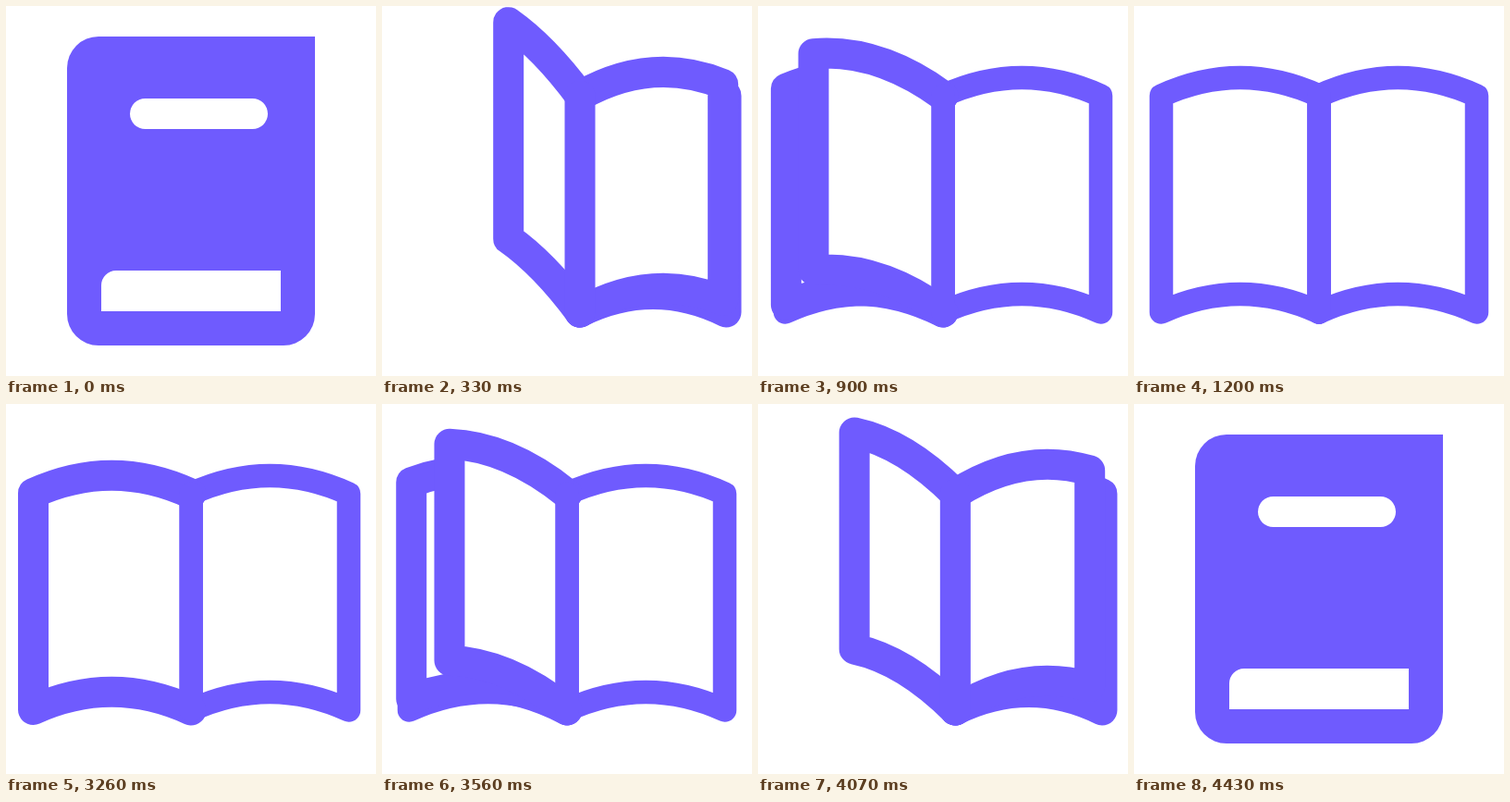
These frames come from a looping animation (400x400 px, 6.46 s). An HTML page:

```html
<!DOCTYPE html>
<html lang="en">
<head>
<meta charset="utf-8">
<title>Book</title>
<style>
  html, body { margin: 0; width: 100%; height: 100%; overflow: hidden; background: #fff; }
  svg { display: block; width: 100vw; height: 100vh; }
  #open path { stroke-linecap: round; stroke-linejoin: round; }
</style>
</head>
<body>
<svg viewBox="0 0 400 400">
  <g id="closed">
    <path fill="#6f5bfe" d="M100 33H334V333a34 34 0 0 1-34 34H100a34 34 0 0 1-34-34V67a34 34 0 0 1 34-34Z"/>
    <rect fill="#fff" x="134" y="100" width="149" height="33" rx="16.5"/>
    <path fill="#fff" d="M103 330V302a16 16 0 0 1 16-16H297V330Z"/>
  </g>
  <g id="open"></g>
</svg>
<script>
const INK = '#6f5bfe', LOOP = 6460, MIRROR = 4430, STEP = 30, OPEN_AT = 1200;
const COVER_END = 545, SHAPED = 330, LEAF_W = 33;
const closed = document.getElementById('closed');
const open = document.getElementById('open');

const clamp = x => Math.min(1, Math.max(0, x));
const mix = (a, b, k) => a + (b - a) * k;
const inOut = x => (1 - Math.cos(Math.PI * clamp(x))) / 2;
const out = x => Math.sin(Math.PI / 2 * clamp(x));

const pages = [
  { start: 300, span: 717 },
  { start: 455, span: 745 }
];

const path = (d, width, fill = 'none', ink = INK) =>
  `<path d="${d}" fill="${fill}" stroke="${ink}" stroke-width="${width}"/>`;

// One side of the book: spine, arched top, outer edge, arched bottom
function side(x, y, dx, dy, height, bulge) {
  const mx = x + dx / 2, my = y + dy / 2 - 2 * bulge;
  return `M${x} ${y}Q${mx} ${my} ${x + dx} ${y + dy}v${height}` +
         `Q${mx} ${my + height} ${x} ${y + height}`;
}

// Size and place of the book while it takes its open shape
function frameAt(t) {
  const k = inOut(t / SHAPED), late = inOut((t - SHAPED) / (COVER_END - SHAPED));
  const x = mix(mix(84.5, 214, k), 200, late);
  const edge = mix(mix(315.5, 372, k), 370.5, late);
  const y = mix(51, 97, k);
  return {
    x, y, width: edge - x,
    height: mix(348.5, 331, k) - y,
    coverHeight: mix(219, 234, k),
    bulge: 19.5 * k,
    stroke: t < COVER_END ? mix(36.5, LEAF_W, k) : 25.5
  };
}

function leafPose(b, turn, isCover) {
  const a = Math.PI * turn, c = Math.cos(a);
  const rise = isCover ? 91 : c > 0 ? 80 - 19 * c : 80 - 14 * c - 18 * c * c;
  return {
    c, dx: b.width * c, dy: -rise * Math.sin(a),
    bulge: b.bulge * Math.abs(c) ** 1.6,
    height: isCover ? b.coverHeight : b.height,
    isCover
  };
}

function drawLeaf(b, p) {
  const front = p.isCover && p.c > 0;
  let s = path(side(b.x, b.y, p.dx, p.dy, p.height, p.bulge), LEAF_W, front ? INK : '#fff');
  if (front) {
    // Title bar on the outside of the cover
    const at = u => `${b.x + p.dx * u} ${b.y + p.dy * u + 65.5 - 4 * p.bulge * u * (1 - u)}`;
    s += path(`M${at(.284)}L${at(.535)}L${at(.787)}`, LEAF_W * p.c, 'none', '#fff');
  }
  return s;
}

function drawOpen(t) {
  const b = frameAt(t), leaves = [];
  let s = path(side(b.x, b.y, b.width, 0, b.height, b.bulge) + 'Z', b.stroke, '#fff');
  if (t < COVER_END) leaves.push(leafPose(b, inOut(t / COVER_END), true));
  else s += path(side(b.x, b.y, -b.width, 0, b.height, b.bulge) + 'Z', b.stroke, '#fff');
  for (const { start, span } of pages)
    if (t > start && t < start + span) leaves.push(leafPose(b, out((t - start) / span), false));
  // The most upright leaf lies on top
  leaves.sort((p, q) => Math.abs(q.c) - Math.abs(p.c));
  for (const p of leaves) s += drawLeaf(b, p);
  return s + path(`M${b.x} ${b.y}v${b.height}`, b.stroke);
}

function render(ms) {
  const now = ms % LOOP;
  const t = now < MIRROR / 2
    ? Math.min(OPEN_AT, Math.floor(now / STEP) * STEP)
    : Math.min(OPEN_AT, Math.max(0, Math.ceil((MIRROR - now) / STEP) * STEP));
  closed.style.display = t ? 'none' : '';
  open.innerHTML = t ? drawOpen(t) : '';
}

const begin = performance.now();
function tick() {
  render(performance.now() - begin);
  requestAnimationFrame(tick);
}
tick();
</script>
</body>
</html>
```
